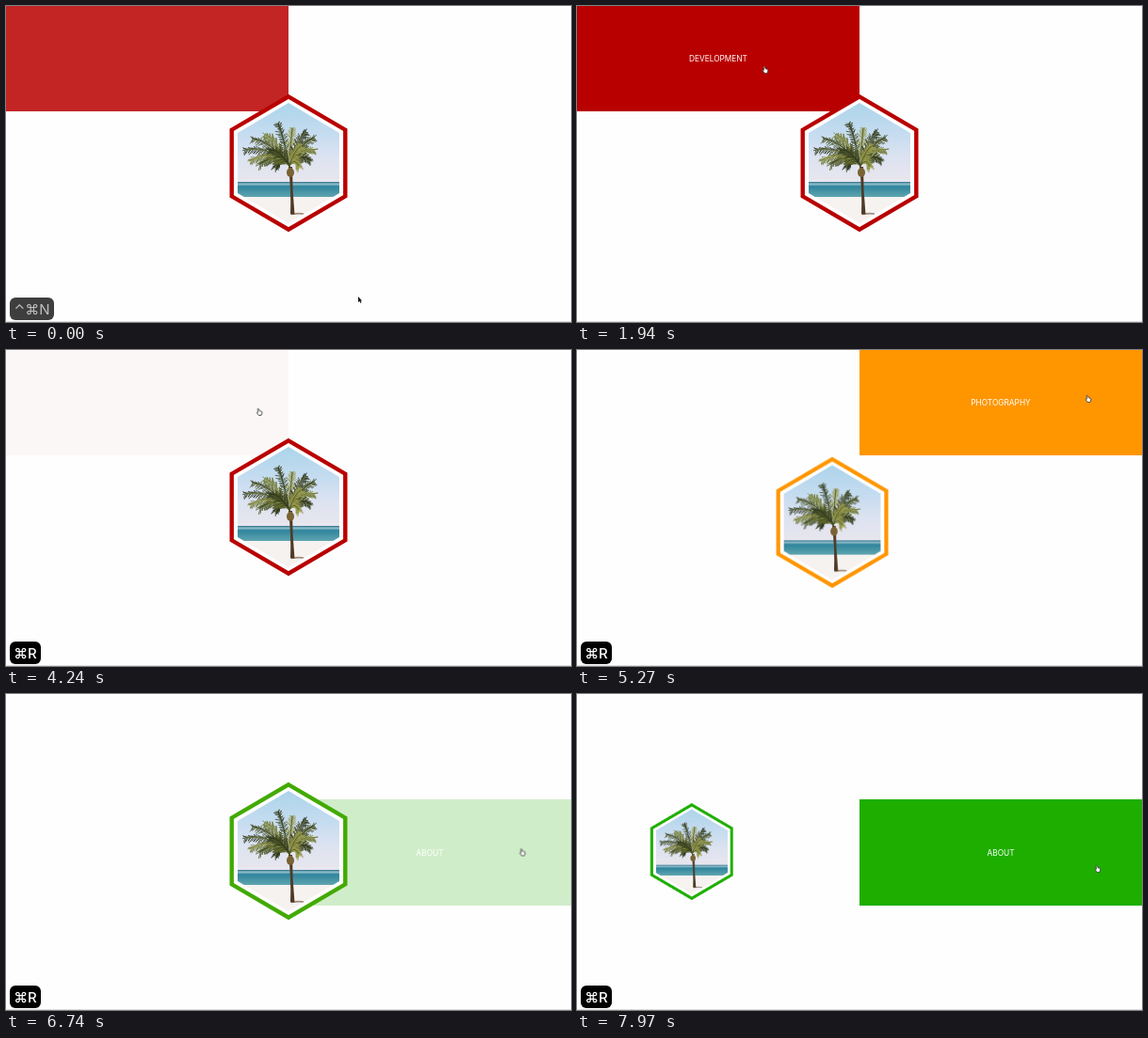
Recreate the animation shown at these times as an HTML page. Size 600 by 336 pixels, loop 8 s.

```html
<!DOCTYPE html>
<html lang="en">
<head>
<meta charset="utf-8">
<title>Hexagon menu</title>
<style>
  :root { --page: #fefefe; --red: #b90000; --orange: #ff9600; --green: #1eae00; }
  html, body { margin: 0; width: 100%; height: 100%; overflow: hidden; background: var(--page); }
  .stage { position: relative; width: 600px; height: 336px; overflow: hidden; background: var(--page); }
  .stage::after { content: ""; position: absolute; left: 0; right: 0; top: 335px; height: 1px; background: #dcdcdc; }
  .stage * { animation-duration: 8s; animation-timing-function: linear; animation-iteration-count: infinite; }

  .cell {
    position: absolute; width: 300px; height: 112px;
    display: flex; align-items: center; justify-content: center;
    font: 400 8.3px Inter, sans-serif; color: #fff;
  }
  .dev { left: 0; top: 0; background: var(--red); animation-name: dev; }
  .photo { left: 300px; top: 0; background: var(--orange); animation-name: photo; }
  .about { left: 300px; top: 112px; height: 113px; background: var(--green); animation-name: about; }
  .dev span { animation-name: dev-text; }
  .photo span { animation-name: photo-text; }

  svg { position: absolute; left: 0; top: 0; }
  .hex { animation-name: move; }
  .frame { fill: var(--page); stroke-width: 4.4; animation-name: frame; }

  .keys {
    position: absolute; left: 4px; top: 309.5px; height: 24px; border-radius: 6px;
    background: #000; color: #fff; text-align: center;
    font: 500 15px/25px Inter, "DejaVu Sans", sans-serif; white-space: nowrap;
  }
  .open { width: 47px; color: #aaa; font-weight: 400; animation-name: open-keys; }
  .reload { width: 33px; animation-name: reload-keys; }

  .cursor { animation-name: cursor; }
  .arrow { animation-name: arrow; }
  .hand { animation-name: hand; }

  @keyframes dev {
    0% { opacity: .86; }
    6%, 15.5% { opacity: 0; }
    22%, 50.6% { opacity: 1; }
    50.625%, 52% { opacity: 0; }
    53%, 53.7% { opacity: .03; }
    57%, 100% { opacity: 0; }
  }
  @keyframes photo {
    0%, 53.7% { opacity: 0; }
    60.5%, 77.49% { opacity: 1; }
    77.5%, 78.5% { opacity: 0; }
    81.5% { opacity: .5; }
    83.8%, 100% { opacity: 0; }
  }
  @keyframes about {
    0%, 82.2% { opacity: 0; }
    84.25% { opacity: .2; }
    89.5%, 100% { opacity: 1; }
  }
  @keyframes dev-text {
    0%, 18% { opacity: 0; }
    23%, 50.6% { opacity: 1; }
    50.625%, 100% { opacity: 0; }
  }
  @keyframes photo-text {
    0%, 58% { opacity: 0; }
    63%, 77.49% { opacity: 1; }
    77.5%, 100% { opacity: 0; }
  }

  /* Each trip lasts 900 ms; the last one is cut off by the end of the loop. */
  @keyframes move {
    0% { transform: translate(300px, 167px) scale(1); }
    35.375% { transform: translate(300px, 167px) scale(1); animation-timing-function: ease; }
    46.625%, 50.61% { transform: translate(600px, 336px) scale(.5); }
    50.625% { transform: translate(300px, 167px) scale(1); }
    64.75% { transform: translate(300px, 167px) scale(1); animation-timing-function: ease; }
    76%, 77.49% { transform: translate(0, 336px) scale(.5); }
    77.5% { transform: translate(300px, 167px) scale(1); }
    95.775% {
      transform: translate(300px, 167px) scale(1);
      animation-timing-function: cubic-bezier(.384, .089, .547, .592);
    }
    100% { transform: translate(106px, 167.6px) scale(.677); }
  }
  @keyframes frame {
    0%, 53.7% { stroke: var(--red); }
    57%, 77.49% { stroke: var(--orange); }
    77.5%, 78% { stroke: var(--red); }
    80.5%, 82% { stroke: var(--orange); }
    84.7%, 100% { stroke: var(--green); }
  }

  @keyframes open-keys {
    0% { opacity: .76; }
    3%, 100% { opacity: 0; }
  }
  @keyframes reload-keys {
    0%, 48.74% { opacity: 0; }
    48.75%, 100% { opacity: 1; }
  }

  @keyframes cursor {
    0%, 2% { transform: translate(374px, 309px); }
    10.6% { transform: translate(347px, 217px); }
    15.5% { transform: translate(286px, 112px); }
    23%, 33% { transform: translate(200px, 68px); }
    35%, 50.6% { transform: translate(217.5px, 83.5px); }
    53% { transform: translate(268.5px, 66px); }
    58% { transform: translate(520px, 54px); }
    60.5%, 80.5% { transform: translate(543px, 52px); }
    84%, 91% { transform: translate(548.5px, 168.5px); }
    95%, 100% { transform: translate(553px, 186px); }
  }
  @keyframes arrow {
    0%, 15.49% { opacity: 1; }
    15.5%, 100% { opacity: 0; }
  }
  @keyframes hand {
    0%, 15.49% { opacity: 0; }
    15.5%, 100% { opacity: 1; }
  }
</style>
</head>
<body>
<div class="stage">
  <div class="cell dev"><span>DEVELOPMENT</span></div>
  <div class="cell photo"><span>PHOTOGRAPHY</span></div>
  <div class="cell about"><span>ABOUT</span></div>

  <svg width="600" height="336">
    <defs>
      <linearGradient id="sky" x1="0" y1="0" x2="0" y2="1">
        <stop offset="0" stop-color="#acd4ea"/>
        <stop offset=".4" stop-color="#c6dcf0"/>
        <stop offset=".7" stop-color="#dde3f1"/>
        <stop offset="1" stop-color="#e8e6ee"/>
      </linearGradient>
      <linearGradient id="sea" x1="0" y1="0" x2="0" y2="1">
        <stop offset="0" stop-color="#2f6f8c"/>
        <stop offset=".15" stop-color="#8fbfca"/>
        <stop offset=".3" stop-color="#2f849c"/>
        <stop offset="1" stop-color="#5fa5b0"/>
      </linearGradient>
      <clipPath id="window"><polygon points="0,-64 54,-32 54,32 0,64 -54,32 -54,-32"/></clipPath>
    </defs>
    <g class="hex">
      <polygon class="frame" points="0,-70.6 60.3,-35.3 60.3,35.3 0,70.6 -60.3,35.3 -60.3,-35.3"/>
      <g clip-path="url(#window)">
        <rect x="-54" y="-64" width="108" height="84" fill="url(#sky)"/>
        <rect x="-54" y="20" width="108" height="16" fill="url(#sea)"/>
        <rect x="-54" y="36" width="108" height="28" fill="#f6f2f0"/>
        <path d="M3 54.5Q10 53 16 54" fill="none" stroke="#9c8a7c" stroke-width="1.6"/>
        <path d="M0 4L4 4Q4 30 6.5 54.5L2 54.5Q3 30 0 4Z" fill="#4e3a26"/>
        <ellipse cx="2" cy="10" rx="4" ry="5" fill="#7a6234"/>
        <g id="palm" fill="none" stroke-linecap="round"></g>
      </g>
    </g>
  </svg>

  <div class="keys open">⌃⌘N</div>
  <div class="keys reload">⌘R</div>

  <svg width="600" height="336">
    <g class="cursor">
      <path class="arrow" d="M0 0V6L1.4 4.8L2.5 7L3.5 6.5L2.5 4.4H4.2Z" fill="#111"/>
      <path class="hand" d="M-2-3.4Q-1.2-4.2-.6-3.2L.2-1.2L2.2-.8Q3-.4 2.8 1L2 3.4H-1L-2.8.6Q-2.6-.4-1.4.2Z"
            fill="#fff" stroke="#333" stroke-width=".8"/>
    </g>
  </svg>
</div>
<script>
  // Frond tips and how far each one arches upward.
  const fronds = [
    [-46, -14, 12], [-38, -26, 9], [-25, -30, 8], [-11, -42, 4], [4, -37, 3],
    [18, -33, 6], [27, -27, 8], [27, -14, 10], [23, -3, 12], [11, 3, 10],
    [-14, 4, 12], [-30, 1, 14], [-40, -3, 14], [-20, -14, 8], [13, -18, 6]
  ];
  const tones = ['#2f3720', '#4c5526', '#6f772f', '#3c4522', '#979a4c'];
  const root = [1, 3];
  const palm = document.getElementById('palm');

  let seed = 7;
  const random = () => (seed = seed * 16807 % 2147483647) / 2147483647;

  const addPath = (d, stroke, width) => {
    const path = document.createElementNS('http://www.w3.org/2000/svg', 'path');
    path.setAttribute('d', d);
    path.setAttribute('stroke', stroke);
    path.setAttribute('stroke-width', width);
    palm.append(path);
  };

  const along = (a, b, c, u) => (1 - u) ** 2 * a + 2 * u * (1 - u) * b + u * u * c;
  const slope = (a, b, c, u) => (1 - u) * (b - a) + u * (c - b);

  fronds.forEach(([x, y, arch], i) => {
    const [rx, ry] = root;
    const cx = rx + (x - rx) * .5, cy = ry + (y - ry) * .6 - arch;
    let leaves = '';
    for (let u = .12; u < 1; u += .035) {
      const px = along(rx, cx, x, u), py = along(ry, cy, y, u);
      const heading = Math.atan2(slope(ry, cy, y, u), slope(rx, cx, x, u));
      for (const side of [-1, 1]) {
        const angle = heading + side * (.5 + random() * .4);
        const len = (4 + random() * 7) * (1.1 - u * .6);
        leaves += `M${px} ${py}l${Math.cos(angle) * len} ${Math.sin(angle) * len + 1.5}`;
      }
    }
    addPath(leaves, tones[i % tones.length], .8);
    addPath(`M${root}Q${cx} ${cy} ${x} ${y}`, tones[(i + 2) % tones.length], .9);
  });
</script>
</body>
</html>
```
